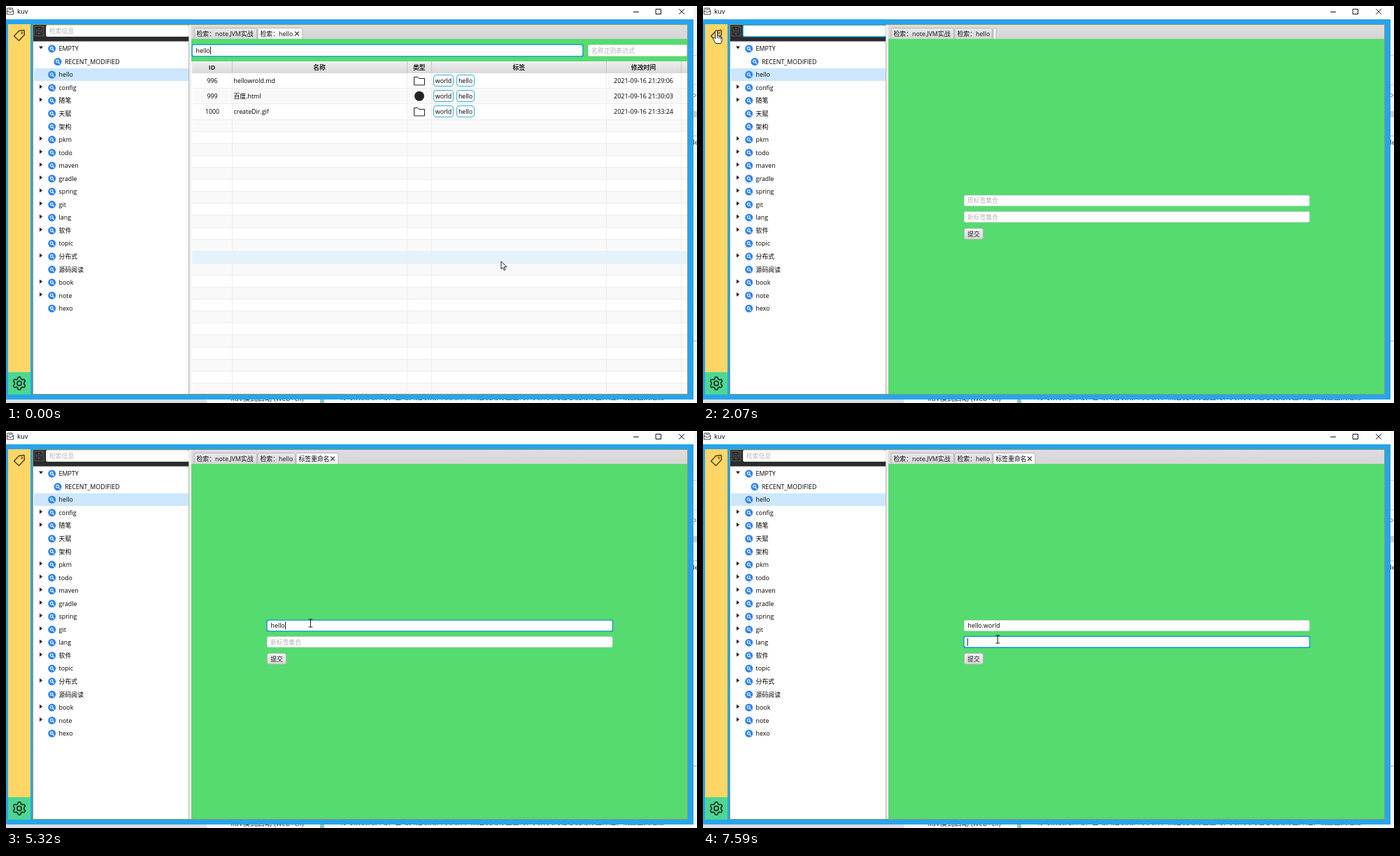
Write an HTML page with a canvas that moves like this. It is 988x567 px and loops after 8 s.

```html
<!DOCTYPE html>
<html lang="zh">
<head>
<meta charset="utf-8">
<style>
  html, body { margin: 0; width: 100%; height: 100%; overflow: hidden; background: #fff; }
  canvas { display: block; }
</style>
</head>
<body>
<canvas id="stage" width="988" height="567"></canvas>
<script>
const ctx = document.getElementById('stage').getContext('2d');
const FONT = '"Open Sans", "Noto Sans CJK SC", "Noto Sans CJK", sans-serif';
const LOOP = 8000, STEP = 1000 / 15, SIZE = 8.85;
const OPEN = 2070, FOCUS_OLD = 3500, FOCUS_NEW = 7400;
const BLUE = '#0496cb', GREEN = '#56db70';

const tree = `-EMPTY|*RECENT_MODIFIED|hello|+config|+随笔|天赋|架构|+pkm|+todo|+maven|+gradle|+spring|+git|+lang|+软件|topic|+分布式|源码阅读|+book|+note|hexo`.split('|');
const columns = [['ID', 266, 323], ['名称', 323, 573], ['类型', 573, 608.5], ['标签', 608.5, 858], ['修改时间', 858, 965]];
const files = [
  ['996', 'hellowrold.md', '2021-09-16 21:29:06'],
  ['999', '百度.html', '2021-09-16 21:30:03'],
  ['1000', 'createDir.gif', '2021-09-16 21:33:24']
];
const typed = [[0, ''], [4230, 'h'], [4520, 'he'], [4650, 'hel'], [4780, 'hell'], [5320, 'hello'],
  [5800, 'hello.'], [6040, 'hello.wo'], [6190, 'hello.wor'], [6500, 'hello.world']];
// Suggestions, each list shown from its start to its end time
const popups = [
  [4230, 4520, '191 elasticsearch|30 theory|9 shell|8 search|6 hexo|6 ssh|6 multi_match|4 hystrix|3 hello|3 autohotkey|3 hash'],
  [4520, 4650, '191 elasticsearch|30 theory|9 shell|8 search|6 hexo|3 hello|3 autohotkey|2 cache|2 header|2 scheme|2 fetch'],
  [4650, 5320, '191 elasticsearch|9 shell|3 hello|2 helper|2 schedule|1 helm|1 health|1 handle|1 whale|1 bundle_hash|1 help'],
  [6040, 6500, '12 workflow|9 windows|6 network|5 world|4 word|3 workspace|3 window|2 power|2 follow|1 download|1 worker']
];
const caretOff = [[460, 930], [2070, 2140], [2550, 3100], [4060, 4230]];
const mousePath = [[890, 708, 365], [1060, 305, 127], [1270, 305, 127], [1930, 19, 36], [2430, 19, 36],
  [2620, 407, 248], [2770, 407, 248], [3400, 436, 275], [6960, 436, 275], [7370, 422, 298]];

function box(x, y, w, h, fill) {
  ctx.fillStyle = fill;
  ctx.fillRect(x, y, w, h);
}

function round(x, y, w, h, r, fill, stroke) {
  ctx.beginPath();
  ctx.roundRect(x, y, w, h, r);
  if (fill) { ctx.fillStyle = fill; ctx.fill(); }
  if (stroke) { ctx.strokeStyle = stroke; ctx.lineWidth = 1; ctx.stroke(); }
}

function shade(y, h, top, bottom) {
  const g = ctx.createLinearGradient(0, y, 0, y + h);
  g.addColorStop(0, top);
  g.addColorStop(1, bottom);
  return g;
}

function widthOf(s) {
  ctx.font = `${SIZE}px ${FONT}`;
  return ctx.measureText(s).width;
}

// y is the middle of the line
function text(s, x, y, color = '#000', align = 'left', size = SIZE) {
  ctx.font = `${size}px ${FONT}`;
  ctx.textAlign = align;
  ctx.fillStyle = color;
  ctx.fillText(s, x, y + 3.2);
}

function path(d, x, y, stroke, fill, width = 1) {
  ctx.save();
  ctx.translate(x, y);
  const p = new Path2D(d);
  if (fill) { ctx.fillStyle = fill; ctx.fill(p); }
  if (stroke) {
    ctx.strokeStyle = stroke;
    ctx.lineWidth = width;
    ctx.lineJoin = ctx.lineCap = 'round';
    ctx.stroke(p);
  }
  ctx.restore();
}

function dot(x, y, r, fill, stroke, width = 1) {
  ctx.beginPath();
  ctx.arc(x, y, r, 0, 7);
  if (fill) { ctx.fillStyle = fill; ctx.fill(); }
  if (stroke) { ctx.strokeStyle = stroke; ctx.lineWidth = width; ctx.stroke(); }
}

function field(x, y, w, h, value, prompt, focused, t) {
  const out = focused ? .6 : 0, inset = .7;
  round(x - out, y - out, w + 2 * out, h + 2 * out, 2.2, focused ? BLUE : '#c3cfc5');
  round(x + inset, y + inset, w - 2 * inset, h - 2 * inset, 1.8, '#fff');
  const mid = y + h / 2;
  if (value) text(value, x + 5.5, mid);
  else if (!focused) text(prompt, x + 5, mid, '#b4b4b4');
  if (focused && !caretOff.some(([a, b]) => t >= a && t < b)) {
    box(Math.round(x + 5.3 + widthOf(value)), mid - 5.5, 1, 11, '#222');
  }
}

function mouseAt(t) {
  let from = mousePath[0];
  for (const to of mousePath) {
    if (t < to[0]) {
      const k = Math.max(0, (t - from[0]) / (to[0] - from[0]));
      const e = k * k * (3 - 2 * k);
      return [from[1] + (to[1] - from[1]) * e, from[2] + (to[2] - from[2]) * e];
    }
    from = to;
  }
  return [from[1], from[2]];
}

function desktop() {
  box(0, 0, 988, 567, '#f4f4f4');
  box(0, 562, 287, 5, '#dedede');
  box(288, 562, 700, 5, '#fafafa');
  box(449, 562, 6, 5, '#93c9ad');
  text('kuv模式启动 (web+cli)', 321, 561, '#333', 'left', 10.5);
  text('有时候模式启动，自动扫描收藏目录文件，然后使用标签查询，文件夹的信息使用标签筛选，设置查找过滤', 477, 559, '#333', 'left', 9.9);
  box(983, 70, 5, 1, '#ccc');
  box(983, 112, 5, 1, '#ccc');
  box(983, 150, 5, 9, '#c8ccd2');
  box(983, 185, 5, 1, '#bbb');
  box(983, 478, 5, 1, '#aaa');
  text('p-', 981, 127, '#555');
  text('le', 982.5, 195, '#222');
}

function gear(x, y) {
  ctx.beginPath();
  for (let a = 0; a < Math.PI * 2; a += .05) {
    const r = 7.9 - 1.2 * Math.tanh(2.5 * Math.cos(6 * a));
    ctx.lineTo(x + r * Math.cos(a), y + r * Math.sin(a));
  }
  ctx.closePath();
  ctx.strokeStyle = '#0c2018';
  ctx.lineWidth = 1.5;
  ctx.stroke();
  dot(x, y, 3.2, null, '#0c2018', 1.5);
}

function frame() {
  box(0, 0, 983, 19, '#fff');
  path('M2.5 3H9L10.5 7V12H1.5V7ZM1.5 7.5H4L5 9H7.5L8.5 7.5H10.5M4 5H8', 0, 0, '#333', null, .9);
  text('kuv', 16, 8, '#000', 'left', 9.5);
  path('M897.5 8.5H904.5M929.5 4.5H936.5V11.5H929.5ZM962.5 4.5L969.5 11.5M969.5 4.5L962.5 11.5', 0, 0, '#111');
  box(0, 19, 983, 543, '#27a4ec');
  box(3, 26, 32, 497, '#ffd665');
  box(3, 523, 32, 32, '#4dd692');
  box(38, 26, 937, 529, '#93996a');
  path('M11.5 43L18.5 35.5L26 34.5L26.5 41L18.5 49.5Z', 0, 0, '#4a3b18', null, 1.4);
  dot(22.8, 38.5, 1.2, null, '#4a3b18');
  gear(19, 539);
}

function sidebar(t) {
  box(39, 27, 223, 24, '#2b2b2b');
  round(40, 28, 14.5, 15.5, 1, '#4b4b4b');
  path('M42.5 30.5H50L52 32.5V41H42.5ZM44.5 30.5V34H49.5V30.5M44.5 41V37H50V41', 0, 0, '#191919');
  field(57, 27, 204.5, 17, '', '检索信息', t >= OPEN && t < FOCUS_OLD, t);
  box(39, 50.5, 223, 503.5, '#fff');
  box(40, 89, 221, 18, '#cce7ff');
  tree.forEach((item, i) => {
    const y = 61 + 18.55 * i, x = item[0] === '*' ? 74 : 65.7;
    if (item[0] === '-') path('M-3 -2H3L0 2Z', 50, y - 1.5, null, '#222');
    if (item[0] === '+') path('M-2 -3V3L2.2 0Z', 50, y - 1.5, null, '#222');
    dot(x, y, 5.5, '#2f84f2');
    dot(x - .5, y - .5, 1.9, null, '#fff', 1.1);
    path('M1 1L2.8 2.8', x, y, '#fff', null, 1.1);
    text(item.replace(/^[-+*]/, ''), x + 9.9, y);
  });
  box(261, 27, 4, 527, '#efefef');
  box(261, 44, 1, 510, '#b5b5b5');
}

function tab(x, w, title, active) {
  round(x + .5, 31.5, w - 1, 17, [2, 2, 0, 0], active ? shade(31, 16, '#fff', '#f0f0f0') : shade(31, 16, '#eaeaea', '#d5d5d5'), '#b4b4b4');
  ctx.save();
  ctx.beginPath();
  ctx.rect(x, 30, w - 1, 18);
  ctx.clip();
  text(title, x + 4, 39.5, '#111');
  if (active) path('M-2.5 -2.5L2.5 2.5M2.5 -2.5L-2.5 2.5', x + w - 8.5, 39.5, '#444', null, 1.2);
  ctx.restore();
}

function tabs(t, tick) {
  box(265, 27, 709, 21, shade(27, 21, '#dedede', '#d5d5d5'));
  tab(268.5, 90.5, '检索：note.JVM实战', false);
  tab(359.5, t < OPEN ? 65 : 54.5, '检索：hello', t < OPEN);
  if (t >= OPEN) tab(414.5, 5 + 56 * Math.min(1, Math.max(0, (tick - 2066) / 200)), '标签重命名', true);
  box(265, 47, 709, 507, GREEN);
}

const rowTop = i => i < 3 ? 96 + 22.2 * i : 162.6 + 17.1 * (i - 3);

function table(t, mouse) {
  field(266, 55, 559, 17, 'hello', '', true, t);
  field(832, 55, 142, 17, '', '名称正则表达式', false, t);
  box(265, 79, 709, 475, '#fff');
  for (let i = 0; rowTop(i) < 554; i++) {
    const y = Math.round(rowTop(i)), end = Math.min(554, Math.round(rowTop(i + 1)));
    const hover = mouse[0] > 266 && mouse[1] >= y && mouse[1] < end;
    box(266, y, 708, end - y, hover ? '#e4f2fd' : i % 2 ? '#f9f9f9' : '#fff');
    box(266, end - 1, 708, 1, '#ededed');
  }
  box(266, 79, 708, 17, shade(79, 17, '#efefef', '#d9d9d9'));
  for (const [name, left, right] of columns) {
    box(Math.floor(right), 79, 1, 17, '#c4c4c4');
    box(Math.floor(right), 96, 1, 458, '#ededed');
    ctx.font = `bold ${SIZE}px ${FONT}`;
    ctx.textAlign = 'center';
    ctx.fillStyle = '#222';
    ctx.fillText(name, (left + right) / 2, 91.2);
  }
  files.forEach(([id, name, date], i) => {
    const y = 106.7 + 22.1 * i, mid = Math.round(y);
    text(id, 295, y, '#000', 'center');
    text(name, 325.5, y);
    if (i === 1) dot(591, y, 7, '#222');
    else path('M-7.5 5.5V-5.5H-2L-.5 -3.5H7.5V5.5Z', 591, mid, '#222');
    for (const [label, x, w] of [['world', 611, 28], ['hello', 644, 25]]) {
      round(x + .5, mid - 8.5, w, 16, 3.5, null, '#38add8');
      text(label, x + .5 + w / 2, y, '#000', 'center');
    }
    text(date, 911.5, y, '#000', 'center', 9);
  });
}

function popup(list) {
  box(374, 287, 492, 214.5, BLUE);
  box(375, 288, 490, 212.5, '#fff');
  ctx.save();
  ctx.beginPath();
  ctx.rect(375, 288, 490, 212.5);
  ctx.clip();
  list.split('|').forEach((entry, i) => {
    const [count, name] = entry.split(' '), y = 298 + 20.67 * i, w = widthOf(count) + 11;
    box(375, y - 10.3, 481, 20.7, i ? i % 2 ? '#f9f9f9' : '#fff' : BLUE);
    round(380.5, y - 7.5, w - 1, 15, 2, shade(y - 8, 16, '#f0f0f0', '#d6d6d6'), '#bcbcbc');
    text(count, 380 + w / 2, y, '#222', 'center');
    text(name, 380 + w + 3, y, i ? '#222' : '#fff');
  });
  box(856, 288, 9, 213, '#ececec');
  round(857, 296, 7, 38, 2, '#dcdcdc', '#bbb');
  path('M-2 1L0 -1L2 1', 860.5, 292, '#888');
  path('M-2 -1L0 1L2 -1', 860.5, 497, '#888');
  ctx.restore();
}

function form(t) {
  const value = typed.filter(([at]) => t >= at).pop()[1];
  field(373, 270, 494.5, 16, value, '原标签集合', t >= FOCUS_OLD && t < FOCUS_NEW, t);
  field(373, 293.3, 494.5, 16, '', '新标签集合', t >= FOCUS_NEW, t);
  round(373.5, 317.5, 27, 15.5, 2.5, shade(317, 16, '#f3f3f3', '#d8d8d8'), '#adb8ae');
  text('提交', 387, 325.3, '#222', 'center');
  const open = popups.find(([a, b]) => t >= a && t < b);
  if (open) popup(open[2]);
}

function cursor(t, [x, y]) {
  const over = (l, top, r, b) => x > l && x < r && y > top && y < b;
  const beam = over(57, 27, 261, 44) || (t < OPEN
    ? over(266, 55, 974, 72)
    : over(373, 270, 867, 286) || over(373, 293, 867, 309));
  if (over(3, 26, 35, 58)) {
    path('M-1.5 0Q0 -2 1.5 0V6Q3 5 4 7Q5.5 6 6.3 8Q8 7.5 8 10V13Q8 15 6.5 17.5H-1L-4.5 11Q-5 8.5 -2.5 9.5L-1.5 10.5ZM1.5 6V9M4 7V10M6.3 8V11', x, y, '#222', '#fff');
  } else if (beam) {
    path('M-2.5 -5.5H2.5M0 -5.5V5.5M-2.5 5.5H2.5', Math.round(x) - .5, Math.round(y) - .5, '#222');
  } else {
    path('M0 0V10.7L2.5 8.4L4.3 12.5L6 11.7L4.2 7.8H7.6Z', x, y, '#222', '#fff');
  }
}

function draw(now) {
  const t = now % LOOP;
  const tick = Math.floor((t + 15) / STEP) * STEP;
  const mouse = mouseAt(tick);
  desktop();
  frame();
  sidebar(t);
  tabs(t, tick);
  if (t < OPEN) table(t, mouse);
  else form(t);
  cursor(t, mouse);
  requestAnimationFrame(() => draw(performance.now() - start));
}

const start = performance.now();
draw(0);
</script>
</body>
</html>
```
